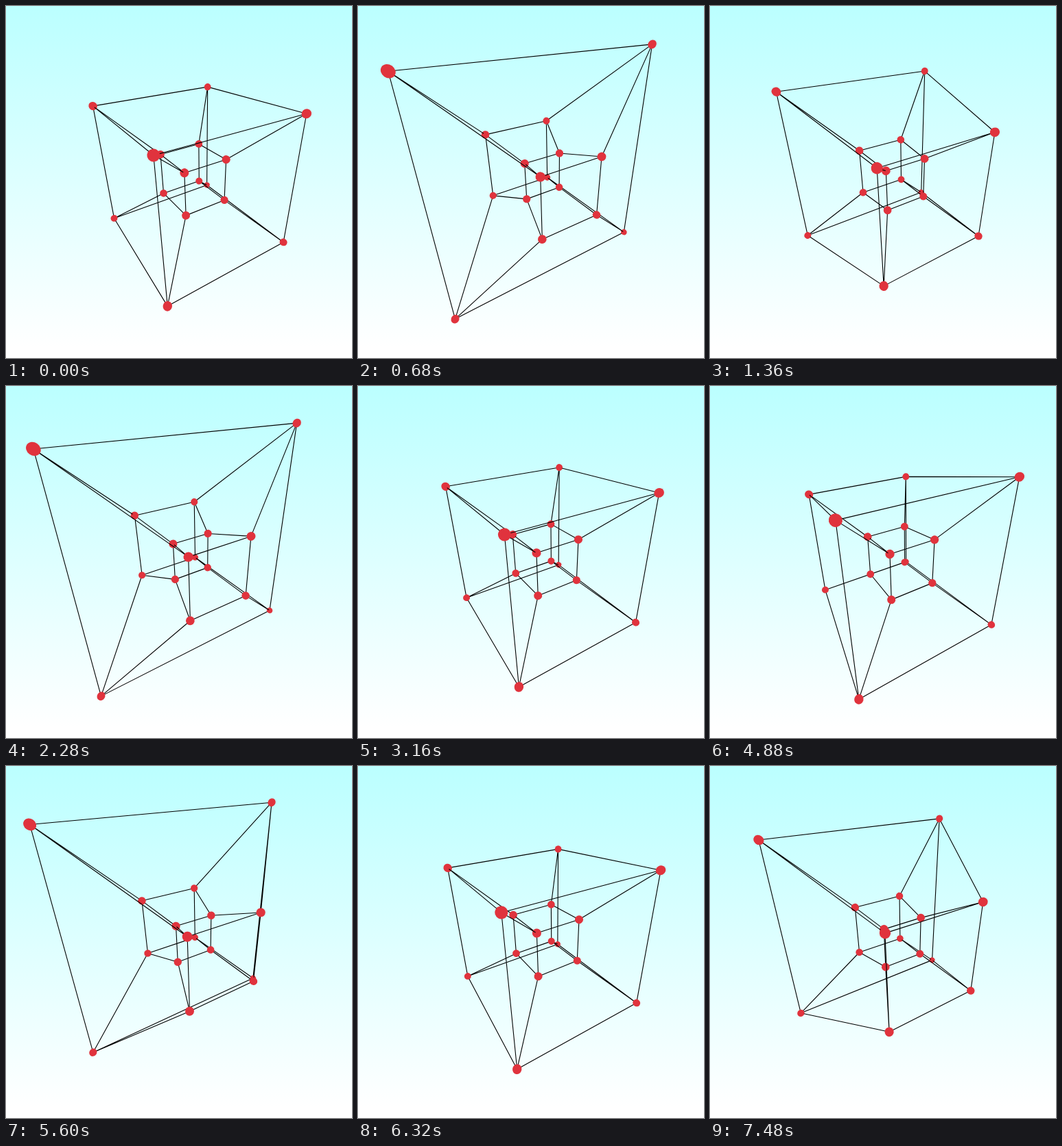
An HTML page with a canvas for the animation above (7.52 s loop, 504 by 514 pixels).

```html
<!DOCTYPE html>
<html lang="en">
<head>
<meta charset="utf-8">
<title>Rotating tesseract</title>
<style>
html, body { margin: 0; width: 100%; height: 100%; overflow: hidden; background: #fff; }
canvas { display: block; }
</style>
</head>
<body>
<canvas id="stage" width="504" height="514"></canvas>
<script>
const ctx = document.getElementById('stage').getContext('2d');
const LOOP = 7520, STEP = 40, FPS = 60;
const CX = 271.5, CY = 250, FOCAL = 432, BALL = 104;
const START = 1.75 * Math.PI / 180, SPEED = 1; // rad, rad per second

// Camera images of the axes: screen x, screen y, depth
const AX = [767.7, -256.5, 1];
const AY = [-16.6, -795, -1.065];
const AZ = [494, 377.5, -1.485];
const DIST = 18.35;

const edges = [];
for (let i = 0; i < 16; i++)
  for (let bit = 1; bit < 16; bit *= 2)
    if (!(i & bit)) edges.push([i, i | bit]);

const sky = ctx.createLinearGradient(0, 0, 0, 499);
sky.addColorStop(0, '#bbffff');
sky.addColorStop(1, '#ffffff');

const sign = (i, bit) => (i & bit ? 1 : -1);

// Rotates vertex i in the zw plane and projects 4D to camera space
function vertex(i, a) {
  const x = sign(i, 1), y = sign(i, 2), z0 = sign(i, 4), w0 = sign(i, 8);
  const z = z0 * Math.cos(a) - w0 * Math.sin(a);
  const w = z0 * Math.sin(a) + w0 * Math.cos(a);
  const s = 1 - w / 2;
  const p = AX.map((v, k) => (x * v + y * AY[k] + z * AZ[k]) / s);
  p[2] += DIST;
  return p;
}

const screen = p => [CX + p[0] / p[2], CY + p[1] / p[2]];
const mix = (p, q, t) => p.map((v, k) => v + (q[k] - v) * t);

// Adds the part of a segment that lies nearer than the given depth
function addLine(p, q, limit) {
  if (p[2] > q[2]) [p, q] = [q, p];
  if (p[2] >= limit) return;
  if (q[2] > limit) q = mix(p, q, (limit - p[2]) / (q[2] - p[2]));
  ctx.moveTo(...screen(p));
  ctx.lineTo(...screen(q));
}

function strokeEdges(pts, limit) {
  ctx.beginPath();
  for (const [i, j] of edges) addLine(pts[i], pts[j], limit);
  ctx.stroke();
}

function drawBall(p, pts) {
  const [u, v] = screen(p);
  const r = BALL / p[2];
  const stretch = Math.hypot(1, (u - CX) / FOCAL, (v - CY) / FOCAL);
  ctx.save();
  ctx.beginPath();
  ctx.ellipse(u, v, r * stretch, r, Math.atan2(v - CY, u - CX), 0, 2 * Math.PI);
  ctx.fill();
  ctx.clip();
  strokeEdges(pts, p[2] - BALL / FOCAL);
  ctx.restore();
}

function draw(ms) {
  // The scene itself advances in whole 60 Hz ticks
  const seconds = Math.floor(ms * FPS / 1000) / FPS;
  const a = START + SPEED * seconds;
  const pts = Array.from({ length: 16 }, (_, i) => vertex(i, a));
  ctx.fillStyle = '#fff';
  ctx.fillRect(0, 0, 504, 514);
  ctx.fillStyle = sky;
  ctx.fillRect(0, 0, 504, 499);
  ctx.strokeStyle = '#000';
  ctx.lineWidth = 1.1;
  strokeEdges(pts, Infinity);
  ctx.fillStyle = '#e0333d';
  [...pts].sort((p, q) => q[2] - p[2]).forEach(p => drawBall(p, pts));
}

const begin = performance.now();
function tick() {
  const t = (performance.now() - begin) % LOOP;
  draw(Math.floor(t / STEP) * STEP);
  requestAnimationFrame(tick);
}
tick();
</script>
</body>
</html>
```
